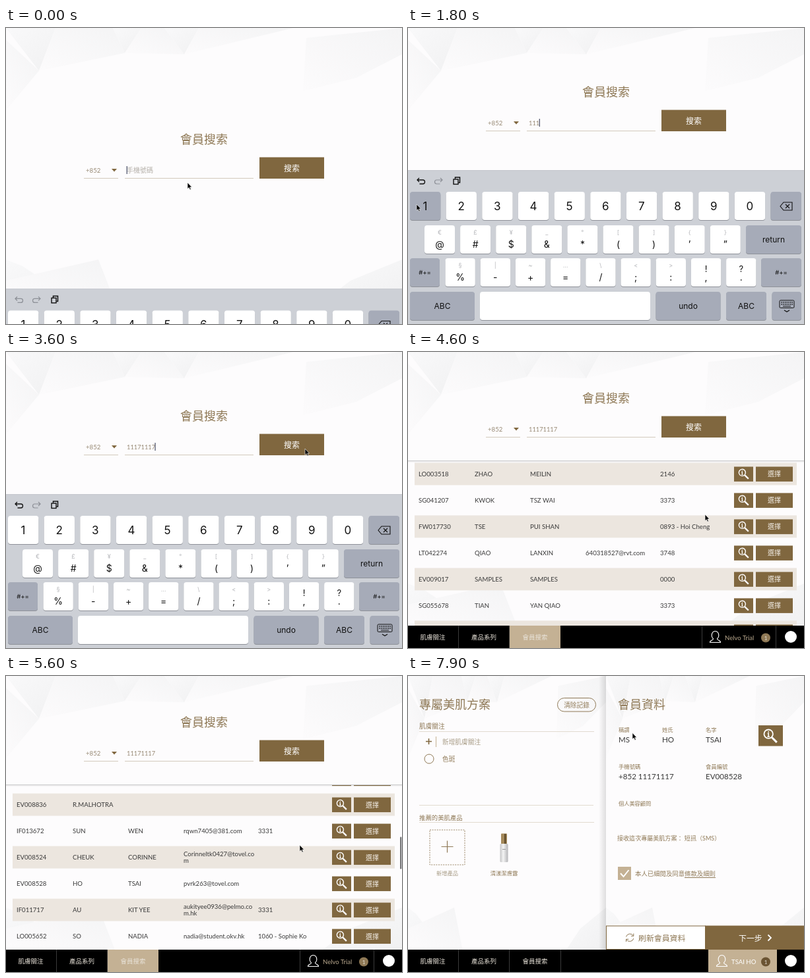
These frames come from a looping animation (600x450 px, 8000 ms). An HTML page:

```html
<!DOCTYPE html>
<html lang="zh-Hant">
<head>
<meta charset="utf-8">
<style>
html, body { margin: 0; height: 100%; overflow: hidden; background: #fdfcfd }
svg { display: block; width: 600px; height: 450px; font-family: Lato, 'Noto Sans CJK TC', 'Noto Sans CJK', sans-serif }
#keys text { font-family: Inter, Roboto, sans-serif }
</style>
</head>
<body>
<svg id="stage" viewBox="0 0 600 450"></svg>
<script>
const LOOP = 8000, PHONE = '11171117';
const BROWN = '#80673f', GOLD = '#8f7956', TAN = '#c4b194', PALE = '#e2dbd0', INK = '#3a3a3a';

// ---- drawing helpers ----
const text = (x, y, s, size, fill = GOLD, extra = '') =>
  `<text x="${x}" y="${y + size * .38}" font-size="${size}" fill="${fill}" ${extra}>${s}</text>`;
const mid = (x, y, s, size, fill, extra = '') => text(x, y, s, size, fill, 'text-anchor="middle" ' + extra);
const rect = (x, y, w, h, fill, extra = '') =>
  `<rect x="${x}" y="${y}" width="${w}" height="${h}" fill="${fill}" ${extra}/>`;
const line = (d, stroke, w = 1, extra = '') =>
  `<path d="${d}" fill="none" stroke="${stroke}" stroke-width="${w}" ${extra}/>`;
const at = (x, y, s, k = 1) => `<g transform="translate(${x} ${y}) scale(${k})">${s}</g>`;
const group = (id, s) => `<g id="${id}">${s}</g>`;
const thin = 'font-weight="300"';

const lens = (x, y, k) => at(x, y,
  '<circle cx="-2" cy="-2" r="4.8" fill="none" stroke="#fff" stroke-width="1.3"/>' +
  line('M1.6 1.6L7 7', '#fff', 2.2) + line('M-2 -5V-3.8M-3 -2.6H-2V.8M-3.2 .8H-.8', '#fff', 1.1), k);
const person = x => at(x, 433, line('M-8 8.5C-8 4.5-3 6-3 3C-7-1-5.5-8.5 0-8.5S7-1 3 3C3 6 8 4.5 8 8.5Z', '#fff', 1.1));

// ---- faceted paper background ----
const facet = (pts, fill) => `<polygon points="${pts}" fill="url(#${fill})"/>`;
const paper = rect(0, 0, 600, 450, '#fdfcfd') +
  facet('0,0 75,0 50,65', 'shadeA') + facet('0,18 50,65 0,125', 'shadeB') +
  facet('75,0 162,0 180,38 50,65', 'shadeB') + facet('162,0 205,0 180,38', 'shadeA') +
  facet('205,0 240,0 270,40 180,38', 'shadeB') + facet('240,0 292,0 270,40', 'shadeA') +
  facet('292,0 435,0 270,40', 'shadeB') + facet('455,15 600,0 600,40 530,76 450,96', 'shadeB') +
  facet('0,352 25,362 82,400 0,416', 'shadeA') + facet('0,384 140,352 165,416 0,416', 'shadeB') +
  facet('600,352 522,384 480,416 600,416', 'shadeA');
const defs = `<defs>
  <linearGradient id="shadeA" x2="1" y2="1"><stop stop-color="#f9f9fa"/><stop offset="1" stop-color="#f1f1f2"/></linearGradient>
  <linearGradient id="shadeB" x1="1" x2="0" y2="1"><stop stop-color="#f4f4f5"/><stop offset="1" stop-color="#fcfbfc"/></linearGradient>
  <linearGradient id="edge"><stop stop-color="#000" stop-opacity="0"/><stop offset="1" stop-color="#000" stop-opacity=".12"/></linearGradient>
  <linearGradient id="glass"><stop stop-color="#c4c4c6"/><stop offset=".4" stop-color="#f4f4f4"/><stop offset="1" stop-color="#b4b4b7"/></linearGradient>
  <clipPath id="listBox"><rect y="165.5" width="600" height="250.5"/></clipPath>
  <clipPath id="panelBox"><rect width="600" height="416"/></clipPath>
  <g id="paper" clip-path="url(#panelBox)">${paper}</g></defs>`;
const halfPaper = x => `<use href="#paper" transform="translate(${x}) scale(.5 1)"/>`;

// ---- search form ----
const form = mid(300, 169, '會員搜索', 18, GOLD, thin) +
  text(121, 216.3, '+852', 9.6, '#988a75') + `<path d="M160 214h8l-4 4.4z" fill="${BROWN}"/>` +
  line('M118 228.5H170M180 228.5H375', '#d3cabc') +
  text(183, 216, '手機號碼', 10, '#b5b0a9', 'id="hint"') +
  text(183, 216.8, '', 9.3, '#988a75', 'id="typed"') + rect(182.6, 210, 1.3, 12, '#555a70', 'id="caret"') +
  rect(384, 196.5, 98, 32.5, BROWN, 'id="go"') + mid(433, 213.2, '搜索', 12, '#fff', thin);

// ---- result list: id, surname, given name, mail, code ----
const people = [
  ['LO003518', 'ZHAO', 'MEILIN', '', '2146'],
  ['SG041207', 'KWOK', 'TSZ WAI', '', '3373'],
  ['FW017730', 'TSE', 'PUI SHAN', '', '0893 - Hoi Cheng'],
  ['LT042274', 'QIAO', 'LANXIN', '640318527@rvt.com', '3748'],
  ['EV009017', 'SAMPLES', 'SAMPLES', '', '0000'],
  ['SG055678', 'TIAN', 'YAN QIAO', '', '3373'],
  ['SG057275', 'SHUM', 'TING TING', '', '2580 - DARA MOK'],
  ['LT004423', 'SHUM', 'TING MAN', '', '1049 - Sophie Tsui'],
  ['FW023091', 'XIONG', 'WEN', 'kpd0364@tovi.hk', '0893 - Hoi Cheng'],
  ['LO041604', 'DAI', 'RUIZHONG', '', '2674 - VIVIEN SHAM'],
  ['EV008836', 'R.MALHOTRA', '', '', ''],
  ['IF013672', 'SUN', 'WEN', 'rqwn7405@381.com', '3331'],
  ['EV008524', 'CHEUK', 'CORINNE', 'Corinneltk0427@tovel.co|m', ''],
  ['EV008528', 'HO', 'TSAI', 'pvrk263@tovel.com', ''],
  ['IF011717', 'AU', 'KIT YEE', 'aukityee0936@pelmo.co|m.hk', '3331'],
  ['LO005652', 'SO', 'NADIA', 'nadia@student.okv.hk', '1060 - Sophie Ko'],
  ['LO009905', 'CHEUK', 'LOK YIN', '', '0893 - Hoi Cheng'],
  ['SG050316', 'LAU', 'WING SZE', '', '3331']
];
const PICK = 13, cols = [16, 101, 185, 269, 382];
const row = (cells, i) => {
  const y = 185.4 + 40 * i;
  const words = cells.map((cell, c) => cell.split('|').map((s, n, all) =>
    text(cols[c], y + (n - (all.length - 1) / 2) * 9.5, s, 9.6, INK)).join('')).join('');
  return (i % 2 ? '' : rect(10, y - 17, 579, 34, '#ece6df')) + words +
    rect(494, y - 11, 29, 22.5, BROWN) + lens(508.5, y, 1.05) +
    rect(527, y - 11, 56, 22.5, BROWN, i == PICK ? 'id="pick"' : '') + mid(555, y + .2, '選擇', 10, '#f4efe8', thin);
};
const list = `<g clip-path="url(#listBox)">${group('rows', people.map(row).join(''))}</g>` +
  rect(0, 165, 600, 1, '#c6c6c8') + rect(0, 166, 600, 2, '#000', 'opacity=".04"') +
  rect(597, 0, 2.4, 49, '#77777a', 'rx="1.2" id="thumb"');

// ---- bottom bar ----
const tabs = (x, names) => names.map((s, i) => mid(x + i * 77.5, 433.5, s, 9.5, '#e8e2d8', thin)).join('');
const user = (x, name, ink, dot) => person(x) + text(x + 14.5, 434.5, name, 9.6, ink) +
  `<circle cx="542" cy="434.5" r="7" fill="${dot}"/>` + mid(542, 434.5, '1', 8, '#e8e2d8');
const mark = '<circle cx="580" cy="433" r="9" fill="#fff"/>';
const navSearch = rect(0, 416, 600, 34, '#000') + rect(154, 416, 77, 34, TAN) +
  line('M76.5 416V450M153.5 416V450M445.5 416V450M557.5 416V450', '#3a3a3a') +
  tabs(37.5, ['肌膚關注', '產品系列', '會員搜索']) + user(465.5, 'Nelvo Trial', '#b9a88d', GOLD) + mark;
const navMember = rect(154, 416, 446, 34, '#000') + rect(455, 416, 104, 34, TAN) +
  line('M231.5 416V450', '#3a3a3a') + tabs(192.5, ['會員搜索']) + user(475.5, 'TSAI HO', '#fff', '#6b5433') + mark;

// ---- plan page (left) and member page (right) ----
const plan = text(17, 43, '專屬美肌方案', 18, GOLD, thin) +
  rect(226.5, 33.5, 58, 20.5, 'none', `rx="10.2" stroke="${GOLD}"`) + mid(255.5, 44, '清除記錄', 9.7) +
  text(17, 76.5, '肌膚關注', 9.7) + line('M17 84.5H282M17 196.5H281M17 222.5H282', PALE) +
  line('M27 99.5H36M31.5 95V104', BROWN, 1.6) + line('M42.5 92V108', TAN) +
  text(52, 100, '新增肌膚關注', 9.7, '#a89c86', thin) +
  `<circle cx="32" cy="126" r="7" fill="none" stroke="${GOLD}"/>` + text(52, 126, '色斑', 9.7) +
  text(17, 215, '推薦的美肌產品', 9.4) +
  rect(33, 234, 53, 53, 'none', `stroke="${GOLD}" stroke-dasharray="2 1.6" stroke-width=".9"`) +
  line('M50.5 259.5H68.5M59.5 250.5V268.5', GOLD, 1.2) + mid(59.5, 299.5, '新增產品', 8.3, '#a89c86') +
  rect(141, 239.5, 9, 16, '#a58a5c', 'rx="1"') + rect(146, 240, 2.5, 15, '#5f4b2b') +
  rect(139.5, 255, 12, 28, 'url(#glass)', 'rx="1.5"') + rect(143, 263, 5, 1, '#999') +
  mid(145.5, 299.5, '清漾潔膚露', 8.3);

const field = (x, y, label, value) => text(x, y, label, 8.4) + text(x, y + 14.5, value, 11.6, INK);
const member = rect(289, 0, 11, 416, 'url(#edge)') + halfPaper(300) +
  text(318, 43, '會員資料', 18, GOLD, thin) +
  field(319, 82, '稱謂', 'MS') + field(385, 82, '姓氏', 'HO') + field(451, 82, '名字', 'TSAI') +
  rect(531, 75, 37, 31.5, BROWN) + lens(549, 91, 1.4) +
  field(319, 138, '手機號碼', '+852 ' + PHONE) + field(451, 138, '會員編號', 'EV008528') +
  text(319, 193.5, '個人美容顧問', 8.2) + text(317, 247, '接收這次專屬美肌方案： 短訊（SMS）', 9.05) +
  rect(318, 290, 20, 20, TAN) + line('M322 300l4.5 5 8-10', '#fff', 2) +
  text(344, 300, '本人已細閱及同意<tspan x="419">條款及細則</tspan>', 9.4) + line('M419 306.5H466', GOLD) +
  rect(300.5, 380, 150, 35.5, '#fff', `stroke="${BROWN}"`) + rect(450, 379.5, 150, 36.5, BROWN) +
  line('M330.5 396.5a6 6 0 0 1 11-1.5M341.8 391.5v3.8h-3.8M341.8 399a6 6 0 0 1-11 1.5M330.5 404v-3.8h3.8', GOLD) +
  text(349, 398, '刷新會員資料', 11.9) + text(501, 398, '下一步', 11.9, '#fff', thin) + line('M545.5 393.5l4.5 4.5-4.5 4.5', '#fff', 1.8);

// ---- keyboard ----
const GREY = '#a6abb8', BLACK = '#111';
const cap = (x, y, w, fill = '#fff', extra = '') =>
  rect(x, y + 1, w, 43, '#8e9198', 'rx="4"') + rect(x, y, w, 43, fill, 'rx="4" ' + extra);
const dark = (x, y, w, label, size = 12) => cap(x, y, w, GREY) + mid(x + w / 2, y + 21.5, label, size, BLACK);
const pairs = (x0, step, y, w, main, alt) => main.split(' ').map((s, i) => {
  const x = x0 + step * i, a = alt.split(' ')[i], strong = /[!?]/.test(a);
  return cap(x, y, w) + mid(x + w / 2, y + (strong ? 16 : 11), a, strong ? 13 : 9, strong ? BLACK : '#b4b5b9') +
    mid(x + w / 2, y + 29, s, 14, BLACK);
}).join('');
const undo = 'M17 228l-3 3 3 3M14.5 231h8a3 3 0 0 1 0 6h-5';
const keys = rect(0, 216, 600, 260, '#cdd0d6') + line('M0 216.5H600', '#c4c7cd') +
  line(undo, BLACK, 1.3, 'id="undo"') + `<g transform="matrix(-1 0 0 1 66 0)">${line(undo, '#8d9097', 1.2)}</g>` +
  line('M71.5 229.5v-2.5h7v8h-2', BLACK, 1.5) + rect(69, 230, 7, 7.5, '#cdd0d6', 'stroke="#111" stroke-width="1.4"') +
  [...'1234567890'].map((d, i) => cap(3 + 54.65 * i, 249, 46.3, '#fff', i ? '' : 'id="one"') +
    mid(26 + 54.65 * i, 270.5, d, 17, BLACK)).join('') +
  cap(549.5, 249, 46.5, GREY) + line('M564 271l5-6h13v12h-13zM572 268l6 6M578 268l-6 6', BLACK, 1.1) +
  pairs(25, 54.1, 300, 46, '@ # $ &amp; * ( ) ’ ”', '€ £ ¥ _ ° [ ] { }') + dark(512, 300, 84, 'return') +
  dark(3, 350, 45, '#+=', 9.5) + pairs(56.5, 53.2, 350, 45.3, '% - + = / ; : , .', '§ | ~ … \\ &lt; &gt; ! ?') +
  dark(535, 350, 61, '#+=', 9.5) +
  dark(3, 401, 98, 'ABC') + cap(109, 401, 258) + dark(375.5, 401, 98, 'undo') + dark(482, 401, 61, 'ABC') +
  cap(551.5, 401, 44.5, GREY) + rect(563, 414, 22, 11.5, 'none', 'rx="1.5" stroke="#111"') +
  line('M565.5 417H583M565.5 420H583', BLACK, 1.5, 'stroke-dasharray="1.5 1.2"') + line('M568 423H580M570 429l4 2.5 4-2.5', BLACK, 1.2);

const arrow = '<path d="M0 0V9.5L2.2 7.6 3.8 11 5.3 10.3 3.8 7H6.6Z" fill="#000" stroke="#fff" stroke-width=".6"/>';

const stage = document.getElementById('stage');
stage.innerHTML = defs + '<use href="#paper"/>' +
  group('search', group('form', form) + group('list', list)) + navSearch + group('keys', keys) +
  group('plan', group('half', halfPaper(0)) + plan + navMember) +
  group('member', member) + group('arrow', arrow);

// ---- motion ----
const $ = id => document.getElementById(id);
const set = (id, name, v) => $(id).setAttribute(name, v);
const move = (id, x, y) => set(id, 'transform', `translate(${x} ${y})`);
const ramp = (t, a, b) => Math.min(1, Math.max(0, (t - a) / (b - a)));
const ease = (t, a, b) => { const p = ramp(t, a, b); return p * p * (3 - 2 * p); };
const out = (t, a, b) => 1 - (1 - ramp(t, a, b)) ** 3;
// Follows [time, ...values] stops
const track = (stops, t, f) => {
  let v = stops[0].slice(1);
  for (let i = 1; i < stops.length; i++) {
    const p = f(t, stops[i - 1][0], stops[i][0]);
    v = v.map((n, k) => n + (stops[i][k + 1] - stops[i - 1][k + 1]) * p);
  }
  return v;
};
const pointer = [[0, 275, 235], [250, 275, 235], [1000, 13, 268], [3200, 13, 268], [3580, 453, 147], [4400, 453, 147],
  [4850, 446, 385], [5200, 445, 306.5], [5400, 445, 257], [5700, 445, 257], [6300, 555.5, 281], [6900, 555.5, 281], [7850, 340, 86.5]];
const glide = [[4650, 0], [4900, 28], [5050, 74], [5200, 138.7], [5300, 214], [5400, 286], [5500, 346],
  [5600, 389.7], [5750, 410], [5950, 420], [6200, 423.3]];

function draw(t) {
  const press = (t - 1150) / 280, count = Math.min(8, Math.max(0, Math.floor(press) + 1));
  const down = press >= 0 && press < 8 && press % 1 < .55;
  move('keys', 0, 182 * (1 - out(t, 0, 350)) + 245 * ease(t, 3800, 4100));
  move('form', 0, -72 * ease(t, 100, 400) - 27 * ease(t, 3800, 4150));
  $('typed').textContent = PHONE.slice(0, count);
  set('hint', 'opacity', count ? 0 : 1);
  set('caret', 'x', 182.6 + count * 5.35);
  set('caret', 'opacity', t < 3700 ? 1 : 0);
  set('one', 'fill', down ? GREY : '#fff');
  set('undo', 'stroke', count ? BLACK : '#8d9097');
  set('go', 'fill', t >= 3700 && t < 3900 ? TAN : BROWN);

  const [y] = track(glide, t, ramp);
  set('list', 'opacity', ramp(t, 3950, 4200));
  move('rows', 0, -y);
  set('thumb', 'y', 168.5 + y * .195);
  set('thumb', 'opacity', ramp(t, 4650, 4750) * (1 - ramp(t, 5950, 6250)));
  set('pick', 'fill', t >= 6400 ? TAN : BROWN);

  set('search', 'opacity', 1 - ramp(t, 6600, 6850));
  set('plan', 'opacity', ramp(t, 6600, 6900));
  set('half', 'opacity', ramp(t, 7500, 7800));
  move('member', 312 * (1 - out(t, 7480, 7850)), 0);
  move('arrow', ...track(pointer, t, ease));
}
function tick(now) {
  draw(now % LOOP);
  requestAnimationFrame(tick);
}
draw(0);
requestAnimationFrame(tick);
</script>
</body>
</html>
```
